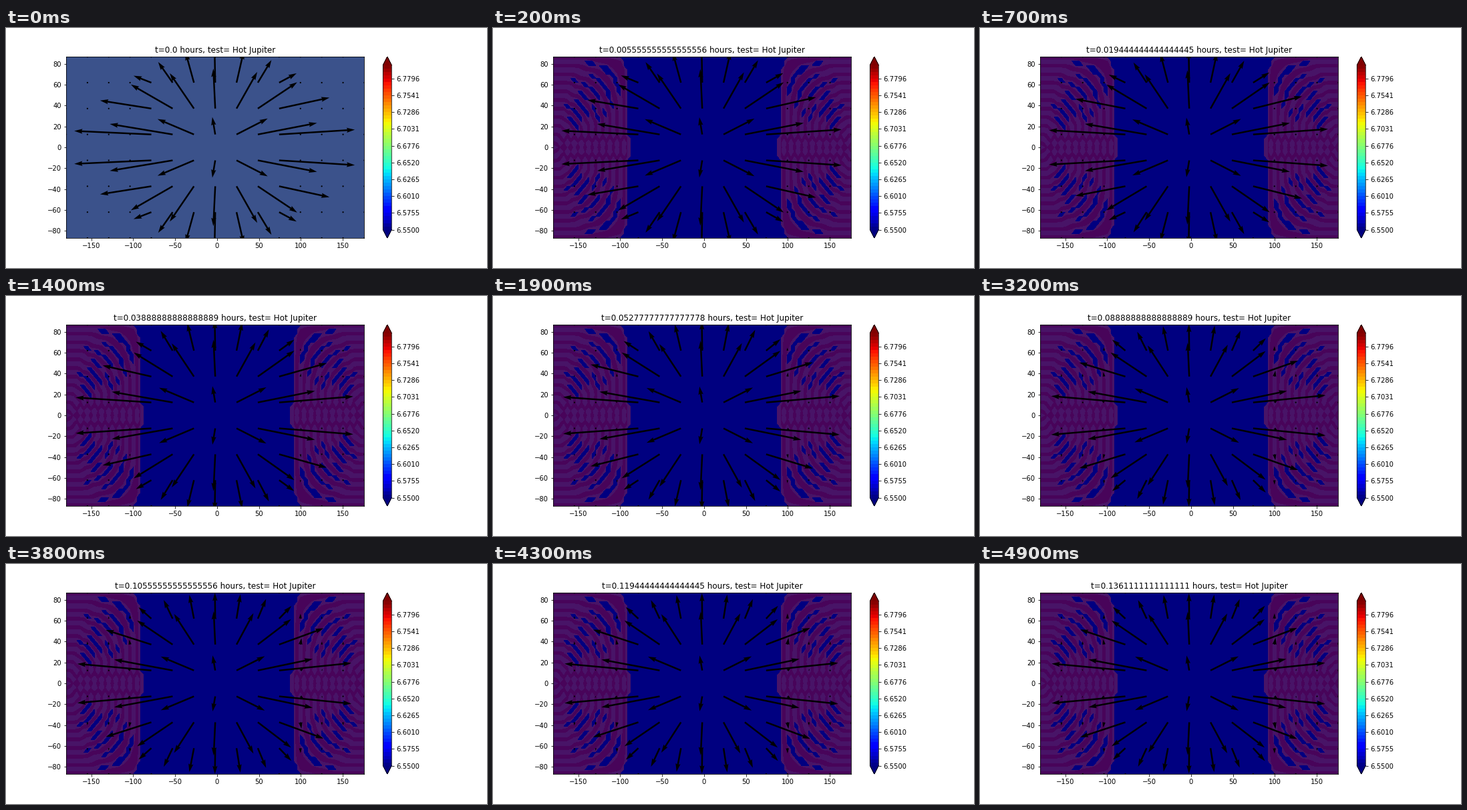
Write a matplotlib script that moves like this. It is 720 px wide and 360 px high and loops after 5000 ms.

```python
import numpy as np
import matplotlib.pyplot as plt
from matplotlib.animation import FuncAnimation
from matplotlib.patches import Rectangle
from numpy.polynomial import legendre

FRAMES, STEP_SECONDS = 50, 10
DEGREE = 42  # spectral truncation
SLATE, DARK, LIGHT = "#3b528b", "#48045a", "#481467"

plt.rcParams.update({
    "font.family": "DejaVu Sans", "font.size": 10, "figure.subplot.bottom": 0.125,
})
fig, ax = plt.subplots(figsize=(10, 5), dpi=72)


def truncate(field, lam, phi, weights):
    """Project a grid field onto spherical harmonics up to DEGREE."""
    xyz = np.stack([np.cos(phi) * np.cos(lam), np.cos(phi) * np.sin(lam), np.sin(phi)],
                   axis=-1).reshape(-1, 3)
    source = (field * weights).ravel()
    lit = source > 0
    # The reproducing kernel depends only on the angle between two points
    angle = np.linspace(0, np.pi, 20001)
    kernel = legendre.legval(np.cos(angle), 2 * np.arange(DEGREE + 1) + 1) / (4 * np.pi)
    between = np.arccos(np.clip(xyz @ xyz[lit].T, -1, 1))
    return (np.interp(between, angle, kernel) @ source[lit]).reshape(field.shape)


# Gauss-Legendre grid and the truncated day-side heating
nodes, node_weights = legendre.leggauss(DEGREE + 1)
lats = np.degrees(np.arcsin(nodes))
n_lon = 2 * DEGREE + 1
lons = -180 + 360 / n_lon * np.arange(n_lon)
lon, lat = np.meshgrid(lons, lats)
lam, phi = np.radians(lon), np.radians(lat)
heating = np.cos(phi) * np.maximum(np.cos(lam), 0)
heating = truncate(heating, lam, phi, node_weights[:, None] * 2 * np.pi / n_lon)

# Night ripples below; above them only the places where the field is positive
ax.contourf(lon, lat, heating, levels=[-9, 0, 9], colors=[DARK, LIGHT])
levels = np.linspace(6.55, 6.8, 50)
positive = np.ma.masked_where(heating <= 0, heating)
surface = ax.contourf(lon, lat, positive, levels=levels, cmap="jet", extend="both")
bar = fig.colorbar(surface, ax=ax, ticks=levels[::5], format="%.4f", aspect=21)
bar.minorticks_off()

cover = ax.add_patch(Rectangle((lons[0], lats[0]), np.ptp(lons), np.ptp(lats),
                               fc=SLATE, ec="none", zorder=1.6))

# Wind as pixel displacements, blended from the first state to the last
qlon, qlat = np.meshgrid(lons[::6], lats[::6])
qlam, qphi = np.radians(qlon), np.radians(qlat)
sin_lat, cos_lat = np.sin(qphi), np.cos(qphi)
day = np.abs(qlon) < 90

u_start = np.where(day, 123.5 * cos_lat ** 2 * np.sin(qlam), 0)
v_start = np.where(day, 124 * sin_lat * cos_lat * np.cos(qlam), 0)

u_day = 121 * cos_lat ** 2.35 * np.sin(qlam) - 4.5 * np.sin(2 * qlam) * cos_lat ** 0.3
u_night = 8 * np.sign(qlam) * np.exp((95 - np.abs(qlon)) / 20) * cos_lat ** 6
u_end = np.where(day, u_day, u_night)
v_end = 107 * sin_lat * cos_lat ** 1.2 * np.maximum(0.32 + 0.68 * np.cos(qlam), 0.1)

wind = ax.quiver(qlon, qlat, u_start, v_start, color="black", width=0.00548,
                 scale=72, scale_units="inches", zorder=3)
ax.set_xlim(lons[0], lons[-1])
ax.set_ylim(lats[0], lats[-1])


def update(frame):
    p = np.sin(np.pi / 2 * frame / (FRAMES - 1))
    wind.set_UVC(u_start + (u_end - u_start) * p, v_start + (v_end - v_start) * p)
    cover.set_visible(frame == 0)
    ax.set_title(f"t={frame * STEP_SECONDS / 3600} hours, test= Hot Jupiter")
    return wind, cover, ax.title


anim = FuncAnimation(fig, update, frames=FRAMES, interval=100, repeat=True,
                     repeat_delay=0, blit=False)
plt.show()
```
